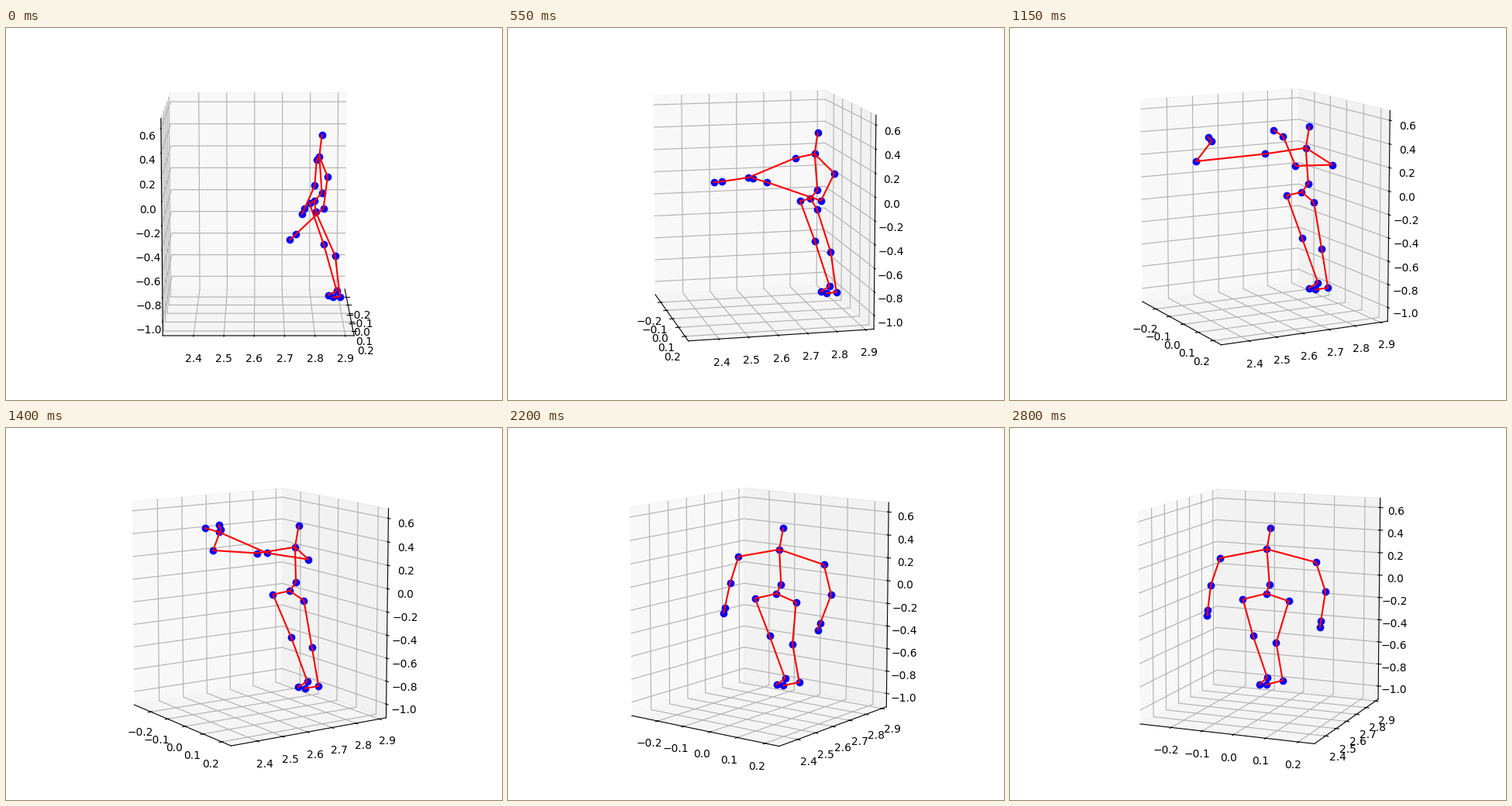
These frames come from a looping animation (640x480 px, 2.85 s). A matplotlib script:

```python
import numpy as np
import matplotlib.pyplot as plt
from matplotlib.animation import FuncAnimation

W, H = 640, 480
FRAMES, INTERVAL = 57, 50
TURN = 1.2  # degrees per frame

# The room is a unit cube: its middle and its size in metres.
MID = np.array([-0.0259, 2.6138, -0.2185])
SIZE = np.array([0.5286, 0.6053, 1.73])

# Standing pose, in cube units.
CHEST = {
    "head": (-0.10, 0.362, 0.357), "neck": (-0.118, 0.349, 0.247),
    "shoulder a": (-0.417, 0.344, 0.184), "shoulder b": (0.177, 0.385, 0.191),
}
PELVIS = {
    "spine": (-0.108, 0.364, 0.063), "hips": (-0.11, 0.322, 0.021),
    "hip a": (-0.25, 0.298, -0.015), "hip b": (0.03, 0.325, -0.01),
}
LEGS = {
    "knee a": (-0.22, 0.38, -0.22), "knee b": (-0.097, 0.443, -0.258),
    "ankle a": (-0.16, 0.455, -0.45), "ankle b": (-0.066, 0.47, -0.461),
    "foot a": (-0.19, 0.41, -0.48), "foot b": (-0.157, 0.435, -0.484),
}
CHAINS = [["head", "neck", "spine", "hips"]]
for side in "ab":
    CHAINS.append(["neck"] + [f"{j} {side}" for j in
                              ("shoulder", "elbow", "wrist", "hand")])
    CHAINS.append(["hips"] + [f"{j} {side}" for j in
                              ("hip", "knee", "ankle", "foot")])

# Arm swing: heading and pitch in degrees at each key time, ending at rest.
TIMES = [0, 11, 18, 28, 35, 44]
SWING = {
    "upper a": [(-80, -83), (-17, -48), (-44, -45), (13, 23), (-41, -57)],
    "fore a": [(6, -80), (49, 16), (143, 67), (85, 76), (39, -10)],
    "upper b": [(68, -81), (-40, -79), (41, 8), (13, 30), (-92, -80)],
    "fore b": [(10, -66), (-34, 32), (-161, 75), (-40, 47), (-10, -3)],
}
LENGTH = {"upper a": 0.252, "fore a": 0.212, "upper b": 0.252, "fore b": 0.23}


def bump(n, mid, width):
    return np.exp(-((n - mid) / width) ** 2)


def bone(name, n):
    """Arm bone as a vector in cube units; heading 0 points forward."""
    keys = SWING[name] + SWING[name][:1]
    head, pitch = (np.radians(np.interp(n, TIMES, k)) for k in zip(*keys))
    way = np.array([np.cos(pitch) * np.sin(head),
                    -np.cos(pitch) * np.cos(head), np.sin(pitch)])
    return LENGTH[name] * way / SIZE


def pose(n):
    p = {k: np.array(v) for k, v in {**CHEST, **PELVIS, **LEGS}.items()}
    sway, lift = -0.075 * bump(n, 34, 8), 0.022 * bump(n, 25, 8)
    for k in CHEST:
        p[k] += (sway / 2, 0, lift)
    for k in PELVIS:
        p[k] += (sway, 0, lift)

    reach = bump(n, 21, 9)
    p["shoulder a"][1] -= 0.11 * reach
    p["shoulder b"][0] -= 0.24 * bump(n, 30, 5.5)
    for s in "ab":
        fore = bone("fore " + s, n)
        p["elbow " + s] = p["shoulder " + s] + bone("upper " + s, n)
        p["wrist " + s] = p["elbow " + s] + fore
        p["hand " + s] = p["wrist " + s] + 0.22 * fore - (0, 0.045 * reach, 0)
    return {k: MID + v * SIZE for k, v in p.items()}


fig = plt.figure(figsize=(W / 100, H / 100), dpi=100, facecolor="white")

# The view is slightly narrower than tall.
room = fig.add_axes([110 / W, 0, 420 / W, 1], projection="3d")
room.apply_aspect = lambda position=None: None
room.set_box_aspect((1, 1, 1), zoom=np.sqrt(3) / 1.8294640721620434)
low, high = MID - SIZE * 25 / 48, MID + SIZE * 25 / 48
room.set(xlim=(low[0], high[0]), ylim=(low[1], high[1]), zlim=(low[2], high[2]))
room.set_xticks(np.linspace(-0.2, 0.2, 5))
room.set_yticks(np.linspace(2.4, 2.9, 6))
room.set_zticks(np.linspace(-1.0, 0.6, 9))

marks, = room.plot([], [], [], "bo")
lines = [room.plot([], [], [], "r-")[0] for _ in CHAINS]


def draw(n):
    room.view_init(elev=10, azim=0.001 - TURN * n)
    joints = pose(n)
    marks.set_data_3d(*zip(*joints.values()))
    for line, chain in zip(lines, CHAINS):
        line.set_data_3d(*zip(*(joints[k] for k in chain)))
    return [marks, *lines]


anim = FuncAnimation(fig, draw, frames=FRAMES, interval=INTERVAL,
                     init_func=lambda: draw(0), repeat=True, blit=False)
plt.show()
```
